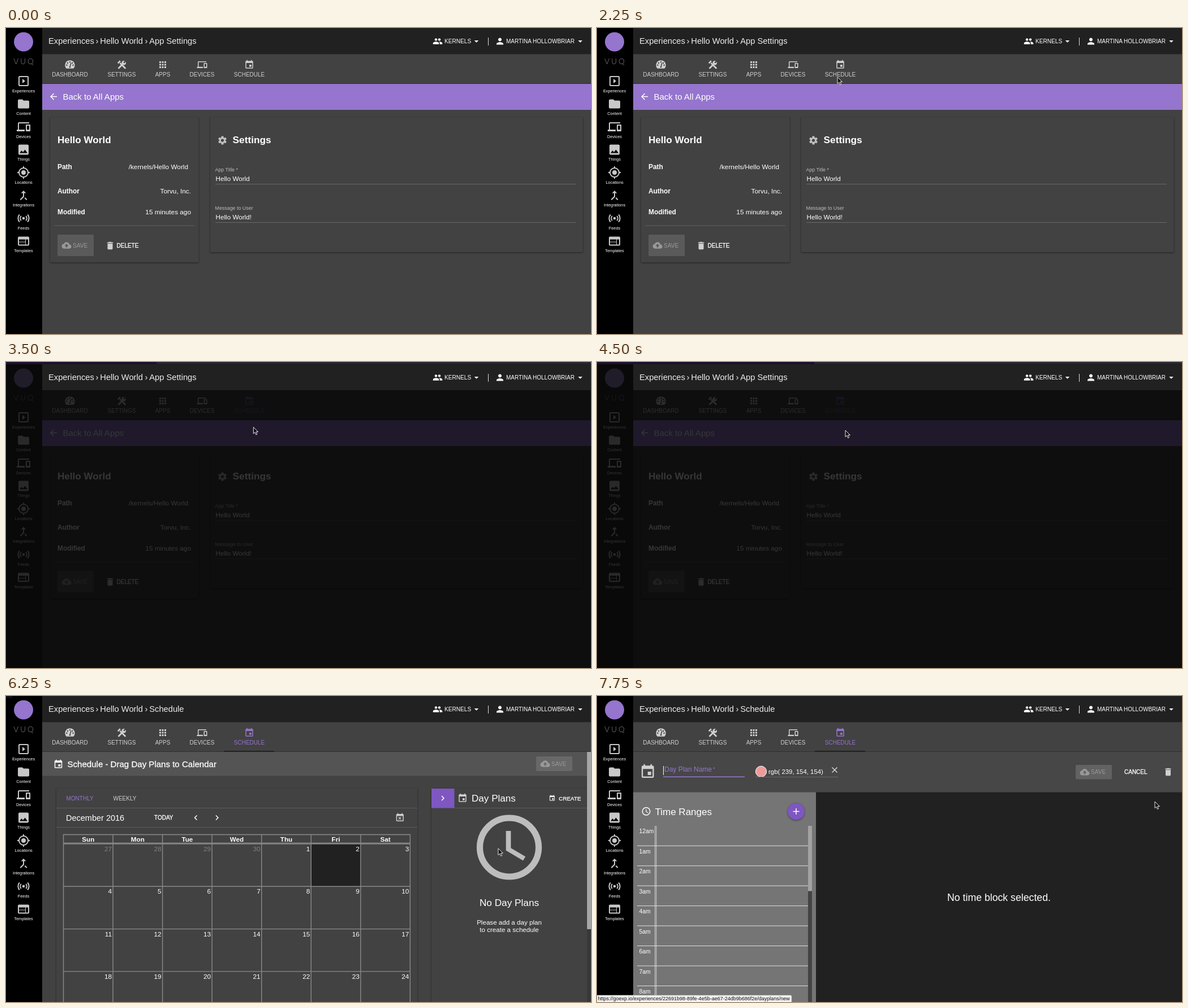
These frames come from a looping animation (1034 by 542 pixels, 8 s). An HTML page:

```html
<!DOCTYPE html>
<html lang="en">
<head>
<meta charset="utf-8">
<title>Schedule walkthrough</title>
<style>
  html, body { margin: 0; width: 100%; height: 100%; overflow: hidden; background: #424242; }
  svg { display: block; width: 1034px; height: 542px; font-family: "Liberation Sans", Arial, sans-serif; }
  text { white-space: pre; }
  .raised { filter: drop-shadow(0 1.5px 1.5px rgba(0, 0, 0, .5)); }
</style>
</head>
<body>
<svg id="stage" viewBox="0 0 1034 542" fill="#fff"></svg>
<script>
const LOOP = 8000, STEP = 250;
const BG = '#424242', DARK = '#212121', PURPLE = '#9575cd', DEEP = '#7e57c2', SOFT = '#d0d0d0';
const MID = 'text-anchor="middle"', END = 'text-anchor="end"', BOLD = 'font-weight="bold"';
const MEDIUM = 'stroke="#fff" stroke-width=".3"';

const ICONS = {
  play: 'M10 8v8l5-4-5-4zm9-5H5c-1.1 0-2 .9-2 2v14c0 1.1.9 2 2 2h14c1.1 0 2-.9 2-2V5c0-1.1-.9-2-2-2zm0 16H5V5h14v14z',
  folder: 'M10 4H4c-1.1 0-2 .9-2 2v12c0 1.1.9 2 2 2h16c1.1 0 2-.9 2-2V8c0-1.1-.9-2-2-2h-8l-2-2z',
  devices: 'M4 6h18V4H4c-1.1 0-2 .9-2 2v11H0v3h14v-3H4V6zm19 2h-6c-.55 0-1 .45-1 1v10c0 .55.45 1 1 1h6c.55 0 1-.45 1-1V9c0-.55-.45-1-1-1zm-1 9h-4v-7h4v7z',
  image: 'M21 19V5c0-1.1-.9-2-2-2H5c-1.1 0-2 .9-2 2v14c0 1.1.9 2 2 2h14c1.1 0 2-.9 2-2zM8.5 13.5l2.5 3.01L14.5 12l4.5 6H5l3.5-4.5z',
  locate: '<circle cx="12" cy="12" r="4"/><path fill="none" stroke-width="2" d="M20 12a8 8 0 1 0-16 0 8 8 0 1 0 16 0zM12 1v3M12 20v3M1 12h3M20 12h3"/>',
  merge: 'M17 20.41L18.41 19 15 15.59 13.59 17 17 20.41zM7.5 8H11v5.59L5.59 19 7 20.41l6-6V8h3.5L12 3.5 7.5 8z',
  feeds: '<circle cx="12" cy="12" r="2.3"/><path fill="none" stroke-width="2" d="M7.8 16a6 6 0 0 1 0-8M16.2 8a6 6 0 0 1 0 8M4.8 18.5a10 10 0 0 1 0-13M19.2 5.5a10 10 0 0 1 0 13"/>',
  web: 'M20 4H4c-1.1 0-2 .9-2 2v12c0 1.1.9 2 2 2h16c1.1 0 2-.9 2-2V6c0-1.1-.9-2-2-2zm-5 14H4v-4h11v4zm0-5H4V9h11v4zm5 5h-4V9h4v9z',
  gauge: `<path d="M3.5 21A11.6 11.6 0 1 1 20.5 21z"/><path stroke="${BG}" stroke-width="2" d="M12 17L14.5 8"/>` +
    [[4.5, 13], [6.5, 8], [12, 5.5], [17.5, 8], [19.5, 13], [12, 17.5]].map(([x, y]) => `<circle cx="${x}" cy="${y}" r="1.6" fill="${BG}"/>`).join(''),
  tools: `<path fill="none" stroke-width="3.6" d="M4 21L15 10M21 21L8 8M3 8.5L8.5 3"/><circle cx="17" cy="7.5" r="5"/><path stroke="${BG}" stroke-width="3.4" d="M17 7.5L22 2.5"/>`,
  apps: [4, 10, 16].map(y => [4, 10, 16].map(x => `<rect x="${x}" y="${y}" width="4" height="4"/>`).join('')).join(''),
  event: 'M17 12h-5v5h5v-5zM16 1v2H8V1H6v2H5c-1.11 0-2 .9-2 2v14c0 1.1.89 2 2 2h14c1.1 0 2-.9 2-2V5c0-1.1-.9-2-2-2h-1V1h-2zm3 18H5V8h14v11z',
  busy: 'M9.31 17l2.44-2.44L14.19 17l1.06-1.06-2.44-2.44 2.44-2.44L14.19 10l-2.44 2.44L9.31 10l-1.06 1.06 2.44 2.44-2.44 2.44L9.31 17zM19 3h-1V1h-2v2H8V1H6v2H5c-1.11 0-2 .9-2 2v14c0 1.1.89 2 2 2h14c1.1 0 2-.9 2-2V5c0-1.1-.9-2-2-2zm0 16H5V8h14v11z',
  back: 'M20 11H7.83l5.59-5.59L12 4l-8 8 8 8 1.41-1.41L7.83 13H20v-2z',
  gear: '<circle cx="12" cy="12" r="5.3" fill="none" stroke-width="3.8"/>' +
    [0, 60, 120, 180, 240, 300].map(a => `<path transform="rotate(${a} 12 12)" d="M9.7 2h4.6l.9 4H8.8z"/>`).join(''),
  cloud: 'M19.35 10.04C18.67 6.59 15.64 4 12 4 9.11 4 6.6 5.64 5.35 8.04 2.34 8.36 0 10.91 0 14c0 3.31 2.69 6 6 6h13c2.76 0 5-2.24 5-5 0-2.64-2.05-4.78-4.65-4.96zM14 13v4h-4v-4H7l5-5 5 5h-3z',
  trash: 'M6 19c0 1.1.9 2 2 2h8c1.1 0 2-.9 2-2V7H6v12zM19 4h-3.5l-1-1h-5l-1 1H5v2h14V4z',
  group: 'M16 11c1.66 0 3-1.34 3-3s-1.34-3-3-3-3 1.34-3 3 1.34 3 3 3zm-8 0c1.66 0 3-1.34 3-3s-1.34-3-3-3-3 1.34-3 3 1.34 3 3 3zm0 2c-2.33 0-7 1.17-7 3.5V19h14v-2.5c0-2.33-4.67-3.5-7-3.5zm8 0c-.29 0-.62.02-.97.05 1.16.84 1.97 1.97 1.97 3.45V19h6v-2.5c0-2.33-4.67-3.5-7-3.5z',
  person: 'M12 12c2.21 0 4-1.79 4-4s-1.79-4-4-4-4 1.79-4 4 1.79 4 4 4zm0 2c-2.67 0-8 1.34-8 4v2h16v-2c0-2.66-5.33-4-8-4z',
  clock: '<circle cx="12" cy="12" r="9" fill="none" stroke-width="2"/><path d="M12.5 7H11v6l5.25 3.15.75-1.23-4.5-2.67z"/>',
  left: 'M15.4 7.4L14 6l-6 6 6 6 1.4-1.4-4.6-4.6z',
  right: 'M10 6L8.6 7.4l4.6 4.6-4.6 4.6L10 18l6-6z',
  caret: 'M7 10l5 5 5-5z',
};

const text = (x, y, s, size = 10, attrs = '') => `<text x="${x}" y="${y}" font-size="${size}" ${attrs}>${s}</text>`;
const rect = (x, y, w, h, fill, attrs = '') => `<rect x="${x}" y="${y}" width="${w}" height="${h}" fill="${fill}" ${attrs}/>`;
const line = (d, color, width = 1) => `<path d="${d}" fill="none" stroke="${color}" stroke-width="${width}"/>`;
const paint = color => `fill="${color}"`;
const group = (id, ...parts) => `<g id="${id}">${parts.join('')}</g>`;
const icon = (name, cx, cy, size = 18, color = '#fff') => {
  const art = ICONS[name], k = size / 24;
  return `<g transform="translate(${cx - size / 2} ${cy - size / 2}) scale(${k})" fill="${color}" stroke="${color}" stroke-width="0">${art[0] === '<' ? art : `<path d="${art}"/>`}</g>`;
};
const card = (x, y, w, h) => rect(x, y, w, h, BG, 'rx="1" class="raised"');
const saveButton = (x, y, h, fill) => rect(x, y, 64, h, fill, 'rx="2"') +
  icon('cloud', x + 16, y + h / 2, 17, '#999') + text(x + 27, y + h / 2 + 3.6, 'SAVE', 10.1, paint('#999'));

function sidebar() {
  const items = [['play', 'Experiences'], ['folder', 'Content'], ['devices', 'Devices'], ['image', 'Things'],
    ['locate', 'Locations'], ['merge', 'Integrations'], ['feeds', 'Feeds'], ['web', 'Templates']];
  return rect(0, -4, 64, 550, '#000') + `<circle cx="31" cy="24.5" r="17" fill="${PURPLE}"/>` +
    text(32.5, 64, 'VUQ', 13.5, `${MID} fill="#888" letter-spacing="3" font-family="Lato, sans-serif" font-weight="300"`) +
    items.map(([name, label], i) => icon(name, 31, 94 + 40.5 * i, 24, '#c8c8c8') +
      text(31, 113.7 + 40.5 * i, label, 7.3, MID)).join('');
}

function header() {
  const crumb = (x, s, attrs = '') => text(x, 28.3, s, 14.7, `fill="#eee" ${attrs}`);
  return rect(64, 0, 970, 46, DARK) +
    crumb(75, 'Experiences') + crumb(158.6, '›') + crumb(166.3, 'Hello World') + crumb(245.6, '›') + crumb(253.3, '', 'id="crumb"') +
    icon('group', 763, 23.5) + text(775, 27, 'KERNELS', 10.1) + icon('caret', 831.5, 23.5) +
    line('M852.5 17V31', '#ddd') +
    icon('person', 873, 23.5) + text(884, 27, 'MARTINA HOLLOWBRIAR', 10) + icon('caret', 1015, 23.5);
}

function nav() {
  const tabs = [['gauge', 'DASHBOARD', 113], ['tools', 'SETTINGS', 204.5], ['apps', 'APPS', 277], ['devices', 'DEVICES', 346.5]];
  const tab = ([name, label, x], color) => icon(name, x, 65, 18, color) + text(x, 85.5, label, 10, `${MID} fill="${color}"`);
  const schedule = ['event', 'SCHEDULE', 430];
  return rect(64, 46, 970, 52.5, BG) + line('M64 46.5H1034', '#363636') + line('M64 98.5H1034', '#2f2f2f') +
    tabs.map(t => tab(t, SOFT)).join('') + group('tabIdle', tab(schedule, SOFT)) + group('tabActive', tab(schedule, PURPLE)) +
    group('tabLine', line('M385 97.7H474', '#1c1c1c', 1.6));
}

function settingsPage() {
  const detail = (y, label, value, x) => text(91, y, label, 11.9, BOLD) + text(x, y, value, 11.8, END);
  const field = (y, label, value) => text(369.5, y, label, 8.9, paint('#bbb')) +
    text(370.5, y + 17.5, value, 11.7) + line(`M370 ${y + 23}H1007`, '#686868');
  return rect(64, 99, 970, 46, PURPLE) + icon('back', 84, 121.5) + text(100.5, 127, 'Back to All Apps', 15) +
    card(78, 158, 262.5, 257) + text(91, 203.5, 'Hello World', 17.1, BOLD) +
    detail(250.3, 'Path', '/kernels/Hello World', 322) + detail(293, 'Author', 'Torvu, Inc.', 327) +
    detail(329.8, 'Modified', '15 minutes ago', 327) + line('M85 350H333', '#606060') +
    saveButton(91, 366, 38, '#5a5a5a') + icon('trash', 184, 385.5, 18, SOFT) + text(195.5, 389, 'DELETE', 10, MEDIUM) +
    card(361, 158, 658.5, 239) + icon('gear', 382.5, 199, 18, '#c0c0c0') + text(400.5, 203.5, 'Settings', 17.3, BOLD) +
    field(253.5, 'App Title *', 'Hello World') + field(321.5, 'Message to User', 'Hello World!');
}

function calendar() {
  const x0 = 101.5, y0 = 262, w = 87.55, h = 75.3, edge = '#8a8a8a';
  let out = rect(x0 + 5 * w, y0, w, h, DARK) + line(`M${x0} 245.5H714.5M${x0} 260.5H714.5`, edge, 1.4);
  ['Sun', 'Mon', 'Tue', 'Wed', 'Thu', 'Fri', 'Sat'].forEach((d, i) => out += text(x0 + (i + .5) * w, 257.6, d, 11.7, `${MID} ${BOLD}`));
  for (let c = 0; c <= 7; c++) out += line(`M${x0 + c * w} 245V542`, edge, 1.4);
  for (let r = 0; r < 4; r++) out += line(`M${x0} ${y0 + r * h}H714.5`, edge, 1.4);
  for (let i = 0; i < 28; i++) {
    const early = i < 4;
    out += text(x0 + (i % 7 + 1) * w - 2, y0 + (i / 7 | 0) * h + 13, early ? 27 + i : i - 3, 11.8, `${END} fill="${early ? '#808080' : '#fff'}"`);
  }
  return out;
}

function schedulePage() {
  return rect(64, 99, 970, 42.5, '#545454') + icon('event', 92.5, 121) +
    text(108.5, 126.3, 'Schedule - Drag Day Plans to Calendar', 15.05, MEDIUM) + saveButton(937, 107, 26, '#686868') +
    card(89, 164, 638, 400) + text(106.5, 184.6, 'MONTHLY', 10, paint(PURPLE)) + text(189.5, 184.6, 'WEEKLY', 10, paint(SOFT)) +
    line('M89 198.5H727M89 232.5H727', '#5c5c5c') +
    text(106, 220.7, 'December 2016', 14.5) + text(262, 219.4, 'TODAY', 10, MEDIUM) +
    icon('left', 335.5, 215.5) + icon('right', 373, 215.5) + icon('busy', 696.3, 215.5, 17.5, SOFT) + calendar() +
    card(752, 164, 275, 400) + rect(752, 164, 40.5, 34.5, DEEP) + icon('right', 772, 181) + icon('event', 807, 181, 18, SOFT) +
    text(823, 187.3, 'Day Plans', 17.1) + line('M792 198.5H1027', '#5c5c5c') +
    group('hover', rect(955, 168, 66, 26, '#5e5e5e', 'rx="2"')) +
    group('ripple', `<clipPath id="button"><rect x="955" y="168" width="66" height="26" rx="2"/></clipPath><circle cx="990" cy="187" r="23" fill="#6c6c6c" clip-path="url(#button)"/>`) +
    icon('event', 965.3, 181, 12) + text(977, 184.6, 'CREATE', 9.9, MEDIUM) +
    `<circle cx="889.5" cy="268" r="52" fill="none" stroke="#bdbdbd" stroke-width="11.2"/>` +
    `<path d="M892.4 239h-8.7v34.5l30.2 18.1 4.3-7.1-25.8-15.3z" fill="#bdbdbd"/>` +
    text(889.5, 372, 'No Day Plans', 17.2, MID) + text(889.5, 405.4, 'Please add a day plan', 11.6, MID) +
    text(889.5, 418.4, 'to create a schedule', 11.6, MID) +
    rect(1027, 99, 7, 443, '#383838') + rect(1027, 99, 7, 314, '#a6a6a6');
}

function plannerPage() {
  let hours = '';
  for (let i = 0; i < 9; i++) {
    hours += text(74.5, 243.4 + 35.45 * i, (i || 12) + 'am', 10.4) + line(`M71 ${265.3 + 35.45 * i}H373`, '#e0e0e0');
  }
  return rect(64, 99, 970, 72, '#474747') + line('M64 98.5H1034', '#2f2f2f') + icon('event', 89.7, 134, 29, SOFT) +
    text(119, 133.8, 'Day Plan Name<tspan font-size="9" dx="2" dy="-2">*</tspan>', 12, paint(PURPLE)) +
    line('M117.5 124V140', '#fff') + line('M117 143.2H261', PURPLE, 1.6) +
    `<circle cx="290" cy="133.8" r="9.6" fill="#ef9a9a" stroke="#fff"/>` + text(303, 137.6, 'rgb( 239, 154, 154)', 11.4) +
    line('M280 143.5H426', '#686868') + line('M415.5 126.5l9 9m0-9l-9 9', '#ddd', 1.4) +
    saveButton(846, 122, 25.5, '#626262') + text(932, 138.2, 'CANCEL', 10, MEDIUM) + icon('trash', 1009.5, 134.5, 18, SOFT) +
    rect(64, 170.5, 323, 372, '#757575') + rect(387, 170.5, 647, 372, DARK) +
    icon('clock', 87, 204.2) + text(102.5, 210.6, 'Time Ranges', 17) +
    `<circle cx="352" cy="204.5" r="15" fill="${DEEP}" class="raised"/>` + line('M346.5 204.5h11M352 199v11', '#fff', 1.5) +
    hours + line('M102.6 230V542M104.8 230V542', '#e0e0e0', .9) +
    rect(373, 230, 7, 312, '#444') + rect(373, 230, 7, 115.5, '#a2a2a2') +
    text(710.5, 363.2, 'No time block selected.', 17.7, MID);
}

const LINK = 'https://goexp.io/experiences/22691b98-89fe-4e5b-ae67-24db9b686f2e/dayplans/new';
const stage = document.getElementById('stage');
stage.innerHTML = rect(0, 0, 1034, 542, BG) +
  group('app', group('settings', settingsPage()), group('schedule', schedulePage()), group('planner', plannerPage()),
    nav(), sidebar(),
    group('dim', rect(64, -4, 970, 550, '#000', 'opacity=".79"'), rect(0, -4, 64, 550, '#0b0b0b', 'opacity=".84"')),
    header()) +
  group('loading', rect(0, 0, 1034, 3.6, '#2a2735'), rect(0, 0, 0, 3.6, '#1b1030', 'id="bar"')) +
  group('status', rect(-1, 530, 345, 13, '#f2f2f2', 'stroke="#aaa" stroke-width=".6" rx="2"'), text(1.5, 539.2, LINK, 9, paint('#111'))) +
  group('leftover', rect(0, 0, 11, 3.6, '#120d22')) +
  `<path id="pointer" d="M0 0v11.6l2.7-2.5 1.9 4.4 2-.9-1.9-4.2h3.7z" fill="#111" stroke="#fff" stroke-width=".9"/>`;

const el = id => document.getElementById(id);
const show = (id, on) => { el(id).style.display = on ? '' : 'none'; };

// Waypoints: time, then values
const POINTER = [[250, 1024, 526], [750, 800, 222], [1250, 570, 54], [1750, 455, 68], [2250, 425, 87], [2500, 427, 81],
  [3000, 434, 104], [3750, 439, 121], [5250, 439, 121], [5750, 580, 245], [6000, 730, 320], [6250, 870, 270],
  [6500, 950, 212], [7000, 986, 187], [8000, 986, 187]];
const BAR = [[2500, 0], [2750, 144], [3750, 307], [4500, 384]];

function along(points, t) {
  const i = points.findIndex(p => p[0] >= t);
  if (i <= 0) return (i ? points[points.length - 1] : points[0]).slice(1);
  const a = points[i - 1], b = points[i], k = (t - a[0]) / (b[0] - a[0]);
  return a.slice(1).map((v, n) => v + (b[n + 1] - v) * k);
}

function render(time) {
  const t = Math.floor(time % LOOP / STEP) * STEP;
  const loading = t >= 2500 && t < 4750, scheduled = t >= 4750, planning = t >= 7750;
  show('settings', !scheduled);
  show('schedule', scheduled && !planning);
  show('planner', planning);
  show('dim', loading);
  show('loading', loading);
  show('leftover', scheduled && t < 6750);
  show('tabIdle', t < 2500);
  show('tabActive', t >= 2500);
  show('tabLine', scheduled);
  show('hover', t >= 6750);
  show('ripple', t >= 7500);
  show('status', t >= 6750);
  show('pointer', t >= 250);
  el('tabActive').setAttribute('opacity', loading && t > 2500 ? .6 : 1);
  el('app').setAttribute('transform', `translate(0 ${loading ? 4 : 0})`);
  el('crumb').textContent = scheduled ? 'Schedule' : 'App Settings';
  el('bar').setAttribute('width', along(BAR, t)[0]);
  el('pointer').setAttribute('transform', `translate(${along(POINTER, t).join(' ')})`);
}

const start = performance.now();
(function tick() {
  render(performance.now() - start);
  requestAnimationFrame(tick);
})();
</script>
</body>
</html>
```
